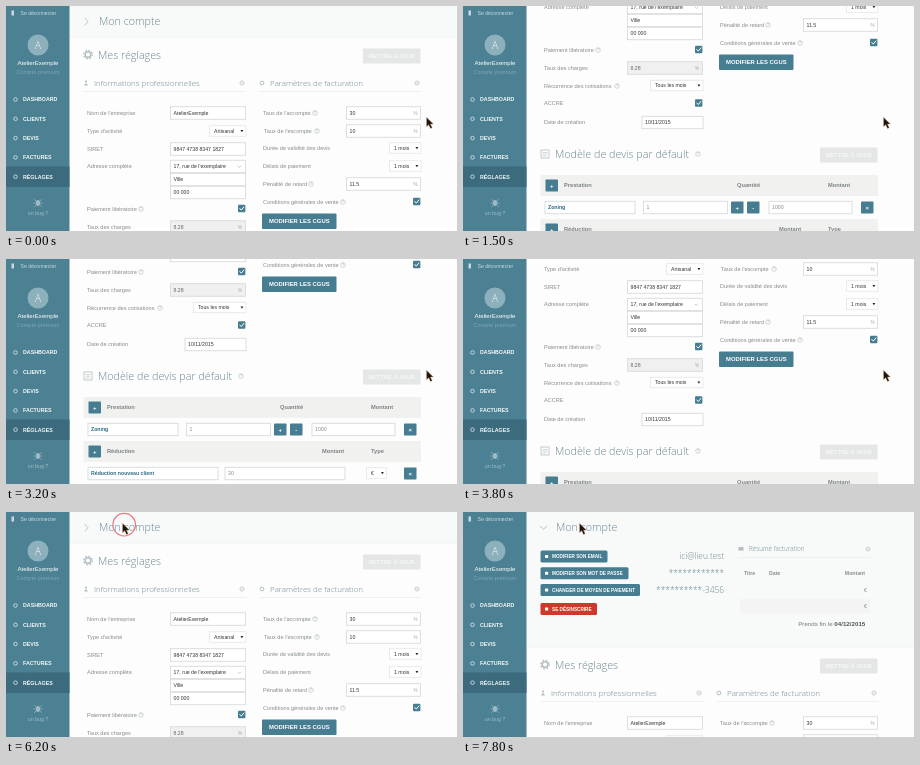
These frames come from a looping animation (451x225 px, 8000 ms). An HTML page:

```html
<!DOCTYPE html>
<html lang="fr">
<head>
<meta charset="utf-8">
<title>Mes réglages</title>
<style>
html, body { margin: 0; width: 100%; height: 100%; overflow: hidden; background: #fdfdfd; }
svg { display: block; width: 451px; height: 225px; font-family: "Liberation Sans", Arial, sans-serif; }
.light { font-family: "Open Sans", sans-serif; font-weight: 300; }
.line { fill: none; stroke-linecap: round; stroke-linejoin: round; }
</style>
</head>
<body>
<svg id="stage" viewBox="0 0 451 225"></svg>
<script>
const TEAL = '#477d90', GREY = '#868c8f', TITLE = '#6a858f', ICON = '#b3bfc4', DARK = '#333';

// Drawing helpers; y is the vertical centre of a text or control.
const rect = (x, y, w, h, fill, more = '') =>
  `<rect x="${x}" y="${y}" width="${w}" height="${h}" fill="${fill}" ${more}/>`;
const text = (x, y, s, size, fill, more = '') =>
  `<text x="${x}" y="${y + size * .35}" font-size="${size}" fill="${fill}" ${more}>${s}</text>`;
const line = (d, color, width = .8) =>
  `<path class="line" d="${d}" stroke="${color}" stroke-width="${width}"/>`;
const ring = (x, y, r, color, width = .7) =>
  `<circle cx="${x}" cy="${y}" r="${r}" fill="none" stroke="${color}" stroke-width="${width}"/>`;
const BOLD = 'font-weight="700"', MID = 'text-anchor="middle"', END = 'text-anchor="end"';

const label = (x, y, s) => text(x, y, s, 5.6, GREY);
const title = (x, y, s, size = 10.75) => text(x, y, s, size, TITLE, 'class="light"');
const help = (x, y) => ring(x, y, 2.3, '#b3bcc0', .6) + text(x, y, '?', 3.6, '#a0abb0', MID);
const box = (x, y, w, h, fill = '#fff', border = '#d3d7d8') =>
  rect(x + .5, y - h / 2, w, h, fill, `stroke="${border}" stroke-width=".8"`);
const input = (x, y, w, s, color = DARK, more = '') => box(x, y, w, 12.5) + text(x + 3.5, y, s, 5.2, color, more);
const select = (x, y, w, s) => box(x, y, w, 10.5, '#fff', '#e4e6e7') + text(x + 5, y, s, 5.2, DARK) +
  `<path d="M${x + w - 5} ${y - 1.1}h2.8l-1.4 2.4z" fill="#222"/>`;
const check = (x, y) => rect(x, y - 3.7, 7.4, 7.4, TEAL, 'rx="1"') +
  line(`M${x + 1.8} ${y}l1.5 1.6 2.6-3.2`, '#fff', 1);
const square = (x, y, s) => rect(x, y - 6, 12.5, 12, TEAL, 'rx=".8"') +
  text(x + 6.25, y, s, 6, '#fff', `${MID} ${BOLD}`);
const save = y => rect(357, y - 7.5, 57.5, 15, '#e5e6e6', 'rx="1"') +
  text(385.7, y, 'METTRE À JOUR', 5.7, '#f7f7f7', `${MID} ${BOLD}`);
const percent = y => text(411.5, y, '%', 4.6, '#a3a9ab', END);

const gear = (x, y) => ring(x, y, 2.8, ICON, 1.4) +
  `<circle cx="${x}" cy="${y}" r="4.2" fill="none" stroke="${ICON}" stroke-width="1.4" stroke-dasharray="1.7 1.6"/>`;
const person = (x, y) => `<circle cx="${x}" cy="${y - 1.4}" r="1.1" fill="${ICON}"/>` +
  `<path d="M${x - 2} ${y + 2.5}q2-4.4 4 0z" fill="${ICON}"/>`;
const fold = (x, y) => ring(x, y, 2.1, ICON) + line(`M${x - 1} ${y}h2`, ICON, .6);
const heading = (x, y, x2, s) => title(x, y, s, 7.95) + fold(x2 - 4, y) +
  line(`M${x - 10} ${y + 8.5}H${x2}`, '#e5eaeb', .6);

function accountHtml() {
  const button = (y, w, s, color = TEAL) => rect(77.5, y - 6, w, 12, color, 'rx="1.5"') +
    rect(82, y - 1.5, 3.2, 3, '#fff', 'rx=".5"') + text(89, y, s, 4.7, '#fff', BOLD);
  const value = (y, s) => text(261, y, s, 8.4, TITLE, `class="light" ${END}`);
  return button(44.5, 67, 'MODIFIER SON EMAIL') + button(61.3, 88, 'MODIFIER SON MOT DE PASSE') +
    button(78, 99.5, 'CHANGER DE MOYEN DE PAIEMENT') + button(97, 56.5, 'SE DÉSINSCRIRE', '#cf392b') +
    value(44, 'ici@lieu.test') + value(61.5, '************') + value(78, '**********-3456') +
    rect(275.5, 35, 5, 3.6, ICON) + title(286, 36.7, 'Résumé facturation', 6.35) + fold(405, 37) +
    line('M276 45.5H408', '#e5eaeb', .6) +
    text(281, 61, 'Titre', 5.2, GREY, BOLD) + text(306, 61, 'Date', 5.2, GREY, BOLD) +
    text(402, 61, 'Montant', 5.2, GREY, `${END} ${BOLD}`) +
    text(404, 78, '€', 5.4, GREY, END) + rect(277, 87, 130, 14, '#f3f4f3') + text(404, 94, '€', 5.4, GREY, END) +
    text(402.3, 111.7, `Prends fin le <tspan ${BOLD} fill="#555">04/12/2015</tspan>`, 6.2, '#72787a', END);
}

function settingsHtml() {
  const left = [[107, "Nom de l'entreprise"], [125, "Type d'activité"], [143, 'SIRET'], [160, 'Adresse complète'],
    [203, 'Paiement libératoire'], [221, 'Taux des charges'], [239, 'Récurrence des cotisations'],
    [256, 'ACCRE'], [275, 'Date de création']];
  const right = [[107, "Taux de l'accompte"], [125, "Taux de l'escompte"], [142, 'Durée de validité des devis'],
    [160, 'Délais de paiement'], [178, 'Pénalité de retard'], [196, 'Conditions générales de vente']];
  const helps = [[135, 203], [154, 239], [309, 107], [311, 125], [305, 178], [337, 196], [235, 307]];
  const each = (list, f) => list.map(f).join('');
  return gear(82, 48.5) + title(92, 49, 'Mes réglages') + save(50) +
    person(80, 77) + heading(88, 77, 240, 'Informations professionnelles') +
    ring(256, 77, 1.9, ICON, 1) + heading(264, 77, 415, 'Paramètres de facturation') +
    each(left, ([y, s]) => label(81, y, s)) +
    each(right, ([y, s]) => label(y === 125 ? 258 : 257, y, s)) +
    each(helps, p => help(...p)) +
    input(164, 107, 75, 'AtelierExemple') + select(203, 125, 36.5, 'Artisanal') +
    input(164, 143, 75, '9847 4738 8347 1827') + input(164, 160.5, 75, "17, rue de l'exemplaire") +
    line('M232 160l1.4 1.5 1.4-1.5', '#aaa', .6) +
    input(164, 173.5, 75, 'Ville') + input(164, 186.5, 75, '00 000') + check(232, 202.5) +
    box(164, 221, 75, 12.5, '#f0f0f0') + text(167.5, 221, '8.28', 5.2, '#666') + text(236, 221, '%', 4.6, '#a3a9ab', END) +
    select(187, 238.5, 52.5, 'Tous les mois') + check(232, 256) + input(178.5, 275.5, 61, '10/11/2015') +
    input(340, 107, 74, '30') + percent(107) + input(340, 125, 74, '10') + percent(125) +
    select(383, 142, 31.5, '1 mois') + select(383, 160, 31.5, '1 mois') +
    input(340, 178, 74, '11.5') + percent(178) + check(407, 195.5) +
    rect(256, 207.5, 74.5, 15.5, TEAL, 'rx="1"') +
    text(293.3, 215.3, 'MODIFIER LES CGUS', 5.9, '#fff', `${MID} ${BOLD}`);
}

function quoteHtml() {
  const head = (y, cells) => rect(77.5, y - 10.5, 337.5, 21, '#f1f2ef') + square(82.5, y, '+') +
    cells.map(([x, s]) => text(x, y, s, 5.7, '#7c8284', BOLD)).join('');
  return rect(78, 303, 8, 8, 'none', `stroke="${ICON}" stroke-width=".8"`) +
    line('M80 305.5h4M80 307.2h4M80 309h3', ICON, .6) +
    title(92, 307.3, 'Modèle de devis par défault') + save(308) +
    head(338.5, [[101, 'Prestation'], [274, 'Quantité'], [365, 'Montant']]) +
    input(81.5, 360.5, 90, 'Zoning', '#2f6a80', BOLD) + input(180, 360.5, 84, '1', '#888') +
    square(268, 360.5, '+') + square(284, 360.5, '-') + input(305.5, 360.5, 83, '1000', '#888') + square(398, 360.5, '×') +
    head(382.5, [[101, 'Réduction'], [316, 'Montant'], [365, 'Type']]) +
    input(81.5, 404.5, 130, 'Réduction nouveau client', '#2f6a80', BOLD) + input(218.5, 404.5, 120, '30', '#888') +
    select(360, 404, 20, '€') + square(398, 404.5, '×');
}

function sidebarHtml() {
  const pale = '#a0bcc7';
  const items = ['DASHBOARD', 'CLIENTS', 'DEVIS', 'FACTURES', 'RÉGLAGES'];
  return rect(0, 0, 63.5, 225, '#4b8193') + rect(0, 160.5, 63.5, 20.5, '#3b6b7d') +
    rect(5.5, 4.5, 2.5, 5, '#c8dae0') + text(14.5, 7.3, 'Se déconnecter', 5.1, '#c8dae0') +
    `<circle cx="32" cy="39" r="10.5" fill="#8db0bd"/>` + text(32, 39, 'A', 10, '#fff', `${MID} class="light"`) +
    text(32, 57, 'AtelierExemple', 6.1, '#fff', MID) + text(32, 66, 'Compte premium', 5.6, '#7ea5b3', MID) +
    items.map((s, i) => {
      const y = 93.5 + i * 19.3;
      return ring(9.5, y, 1.8, '#cfdfe5', .9) + text(17, y, s, 5.3, '#f4f8f9', BOLD);
    }).join('') +
    `<ellipse cx="32" cy="197" rx="2" ry="3" fill="${pale}"/>` +
    line('M28.5 193.5l2 2M35.5 193.5l-2 2M28 197h8M28.5 200.5l2-2M35.5 200.5l-2-2', pale, .7) +
    text(32, 207, 'un bug ?', 5.3, pale, MID);
}

const stage = document.getElementById('stage');
stage.innerHTML = `
  <defs><clipPath id="fold"><rect id="reveal" x="63" y="31" width="388" height="0"/></clipPath></defs>
  ${rect(0, 0, 451, 225, '#fdfdfd')}
  <g id="page">
    <rect id="band" x="63" y="0" width="388" height="31" fill="#f8fafa"/>
    <g id="chevron">${line('M79 12.3l3 3.4-3 3.4', ICON, .9)}</g>
    ${title(93, 15.5, 'Mon compte')}
    <g clip-path="url(#fold)">${accountHtml()}</g>
    <g id="rest">${line('M63 31H451', '#ebf0f0', .7)}${settingsHtml()}${quoteHtml()}</g>
  </g>
  ${sidebarHtml()}
  <circle id="click" cx="118.2" cy="12.7" r="11.3" fill="none" stroke="#e8797b" stroke-width="1.2"/>
  <path id="cursor" d="M0 0V9.4L2.2 7.5 4 11.3 5.7 10.5 4 6.8H6.9Z" fill="#20150f" stroke="#d9b98c" stroke-width=".4"/>`;
const $ = id => document.getElementById(id);

function ease(t, from, to) {
  const p = Math.min(1, Math.max(0, (t - from) / (to - from)));
  return p * p * (3 - 2 * p);
}

function draw() {
  // The picture advances ten times a second.
  const t = Math.floor(performance.now() % 8000 / 100) * 100;
  const scroll = Math.round(204 * ease(t, 900, 1760) - 14 * ease(t, 2500, 2900) - 190 * ease(t, 3500, 4200));
  const open = ease(t, 6300, 6800), height = Math.round(104 * open);
  const move = ease(t, 4500, 5800);

  $('page').setAttribute('transform', `translate(0 ${-scroll})`);
  $('rest').setAttribute('transform', `translate(0 ${height})`);
  $('band').setAttribute('height', 31 + height);
  $('reveal').setAttribute('height', height);
  $('chevron').setAttribute('transform', `rotate(${90 * open} 80.5 15.7)`);
  $('cursor').setAttribute('transform', `translate(${420.5 - 304 * move} ${111.3 - 100 * move})`);
  $('click').setAttribute('visibility', t >= 6100 && t < 6300 ? 'visible' : 'hidden');
  requestAnimationFrame(draw);
}
draw();
</script>
</body>
</html>
```
